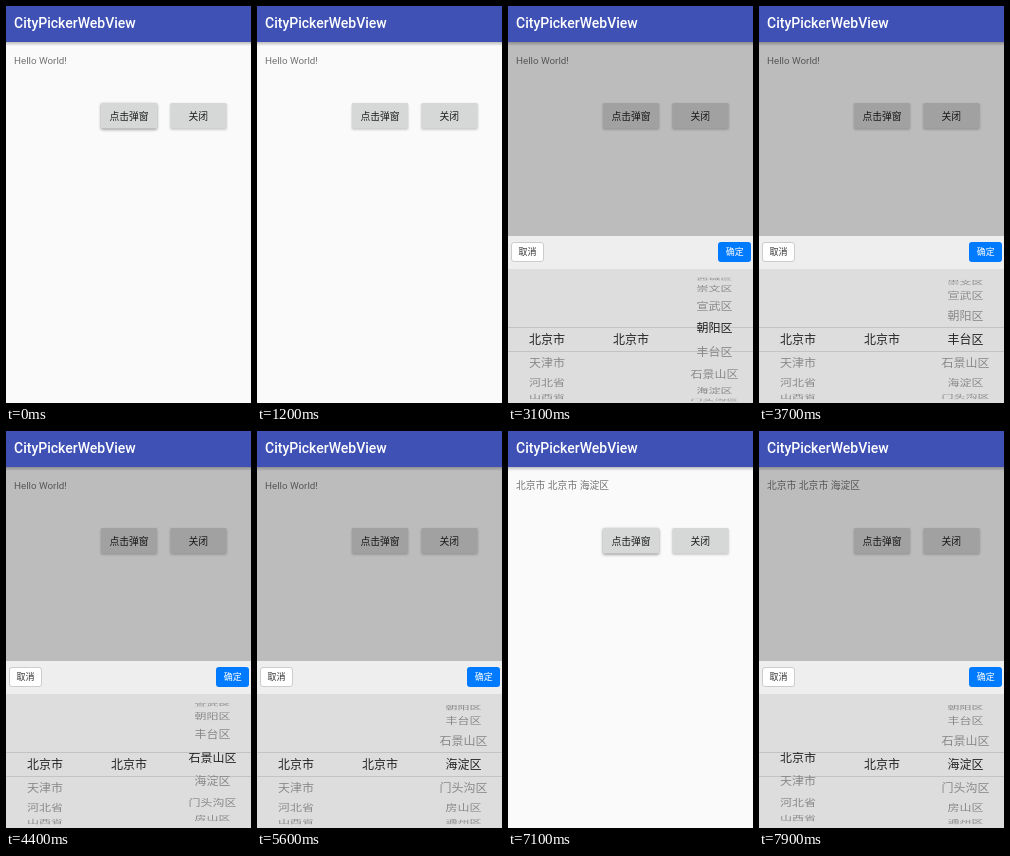
An HTML page for the animation above (8000 ms loop, 245 by 397 pixels).

```html
<!DOCTYPE html>
<html lang="zh-CN">
<head>
<meta charset="utf-8">
<title>CityPickerWebView</title>
<style>
  html, body { margin: 0; width: 100%; height: 100%; overflow: hidden; background: #fafafa; }
  svg { display: block; width: 245px; height: 397px; }
  text { font-family: Roboto, "Noto Sans CJK SC", "Noto Sans CJK", sans-serif; font-size: 9.8px; }
  .mid { text-anchor: middle; }
  .title { font-size: 14px; font-weight: 500; fill: #fff; }
  .btn { fill: #d6d7d7; filter: drop-shadow(0 1px 1px rgba(0, 0, 0, .25)); }
  .btn.pressed { filter: drop-shadow(0 1px 1.6px rgba(0, 0, 0, .45)); }
  .small { font-size: 9px; }
  .wheel text { font-size: 12px; fill: #888; text-anchor: middle; }
  .wheel text.on { fill: #222; }
</style>
</head>
<body>
<svg viewBox="0 0 245 397">
  <defs>
    <linearGradient id="shade" x2="0" y2="1">
      <stop stop-color="#000" stop-opacity=".25"/>
      <stop offset="1" stop-color="#000" stop-opacity="0"/>
    </linearGradient>
  </defs>
  <rect width="245" height="397" fill="#fafafa"/>
  <rect y="36" width="245" height="4" fill="url(#shade)"/>
  <text id="label" x="8" y="58" fill="#737373"></text>
  <rect id="open" class="btn" x="95" y="97" width="56" height="25.5" rx="1.3"/>
  <rect class="btn" x="164.5" y="97" width="56" height="25.5" rx="1.3"/>
  <text class="mid" x="123" y="113.6" fill="#1d1d1d">点击弹窗</text>
  <text class="mid" x="192.3" y="113.6" fill="#1d1d1d">关闭</text>
  <rect id="dim" y="36" width="245" height="361"/>
  <g id="panel">
    <rect y="230" width="245" height="34" fill="#eee"/>
    <rect y="263" width="245" height="134" fill="#ddd"/>
    <rect x="3.5" y="236.5" width="32" height="19" rx="2.5" fill="#fff" stroke="#ccc"/>
    <text class="mid small" x="19.5" y="249.4" fill="#333">取消</text>
    <rect x="210" y="236" width="33" height="20" rx="3" fill="#007aff"/>
    <text class="mid small" x="226.7" y="249.4" fill="#fff">确定</text>
    <path d="M0 321.5H245M0 345.5H245" stroke="#c3c3c3"/>
    <g id="wheels"></g>
  </g>
  <rect width="245" height="36" fill="#3f51b5"/>
  <text class="title" x="8" y="22">CityPickerWebView</text>
</svg>
<script>
const $ = id => document.getElementById(id);
const LOOP = 8000, STEP = 100;
const CENTER = 333, RADIUS = 62, ANGLE = 22.2 * Math.PI / 180;

function el(name, parent) {
  return parent.appendChild(document.createElementNS('http://www.w3.org/2000/svg', name));
}

// Builds a drum of labels and returns a function that turns it to a position.
function wheel(x, names) {
  const group = el('g', $('wheels'));
  group.setAttribute('class', 'wheel');
  const items = names.split(' ').map(name => {
    const item = el('text', group);
    item.textContent = name;
    item.setAttribute('y', 4.5);
    return item;
  });
  return pos => items.forEach((item, i) => {
    const a = (i - pos) * ANGLE;
    const visible = Math.abs(a) < 1.42;
    item.style.display = visible ? '' : 'none';
    if (!visible) return;
    const y = CENTER + RADIUS * Math.sin(a);
    item.setAttribute('transform', `translate(${x} ${y}) scale(1 ${Math.cos(a)})`);
    item.setAttribute('class', i === Math.round(pos) ? 'on' : '');
  });
}

const province = wheel(39, '北京市 天津市 河北省 山西省');
const city = wheel(123, '北京市');
const district = wheel(206.5,
  '东城区 西城区 崇文区 宣武区 朝阳区 丰台区 石景山区 海淀区 门头沟区 房山区 通州区 顺义区');

// Decelerating progress from 0 to 1.
function fling(t, from, to, power) {
  const u = Math.min(1, Math.max(0, (t - from) / (to - from)));
  return 1 - (1 - u) ** power;
}

function openness(t) {
  if (t < 6000) return fling(t, 1300, 1500, 1.6);
  if (t < 7100) return 1 - fling(t, 5900, 6200, 1.4);
  return fling(t, 7100, 7400, 1.6);
}

function draw(now) {
  const t = Math.floor(now % LOOP / STEP) * STEP;
  const open = openness(t);
  $('dim').setAttribute('fill-opacity', .25 * open);
  $('panel').setAttribute('transform', `translate(0 ${167 * (1 - open)})`);
  $('open').classList.toggle('pressed', t < 1200 || (t >= 7100 && t < 7300));
  $('label').textContent = t < 6000 ? 'Hello World!' : '北京市 北京市 海淀区';
  province(t < 7900 ? 0 : .29);
  city(0);
  district(5 * fling(t, 2200, 3900, 2.96) + 2 * fling(t, 4000, 5600, 3.6));
}

function tick() {
  draw(performance.now());
  requestAnimationFrame(tick);
}
tick();
</script>
</body>
</html>
```
